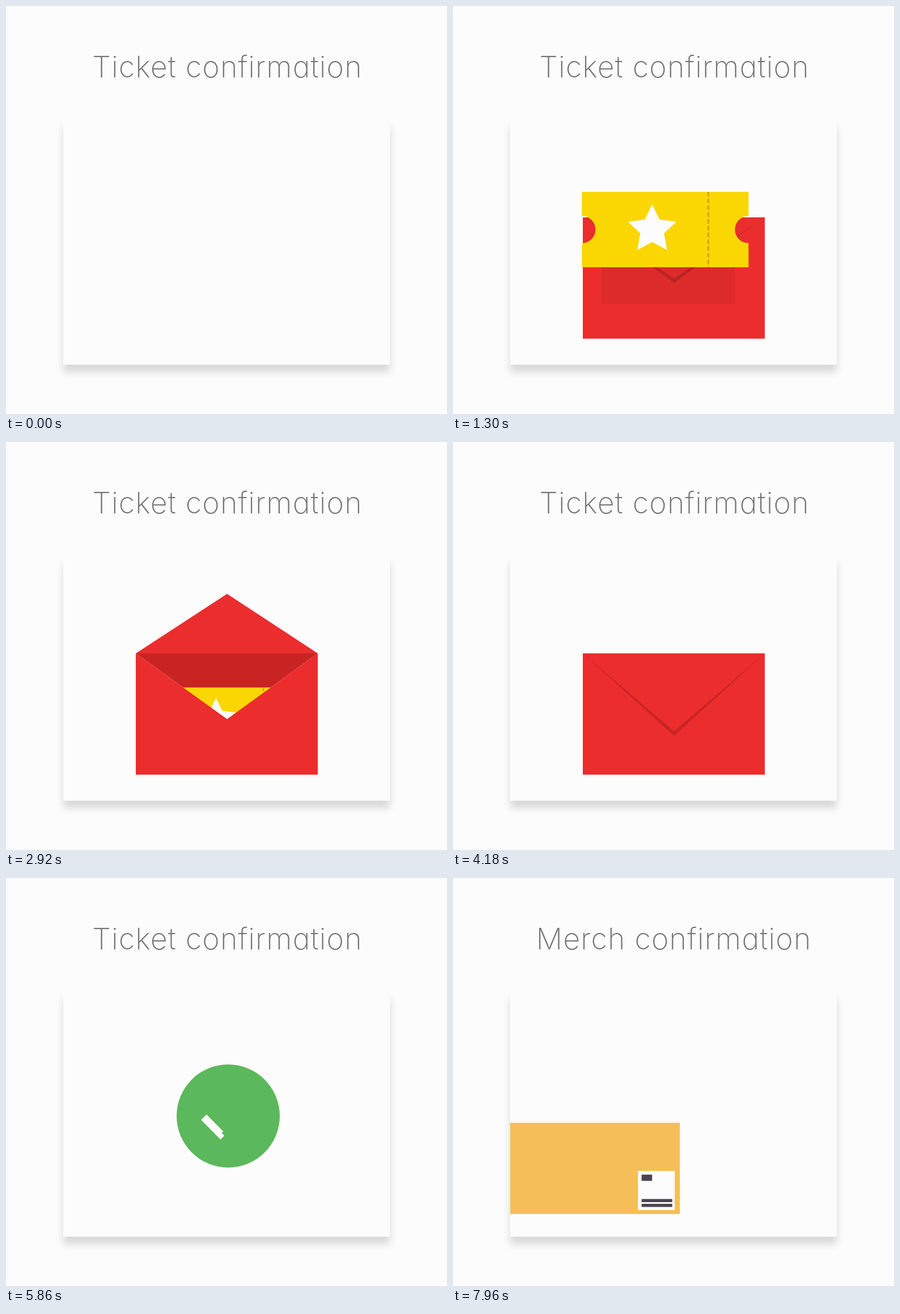
An HTML page that plays this animation: 778 px wide and 720 px high, repeating every 8000 ms.

```html
<!DOCTYPE html>
<html lang="en">
<head>
<meta charset="utf-8">
<title>Ticket confirmation</title>
<style>
  html, body { margin: 0; width: 100%; height: 100%; overflow: hidden; background: #fcfcfc; }
  #card {
    position: absolute; left: 101px; top: 201px; width: 576px; height: 432px;
    background: #fcfcfc; box-shadow: 0 13px 13px rgba(0, 0, 0, .145);
  }
  svg { position: absolute; left: 0; top: 0; display: block; }
  text {
    font: 200 52px Inter, Lato, sans-serif; font-feature-settings: "cv11";
    font-optical-sizing: none; letter-spacing: .022em; text-anchor: middle; fill: #757575;
  }
  #caption { font-size: 46px; }
</style>
</head>
<body>
<div id="card"></div>
<svg width="778" height="720" viewBox="0 0 778 720">
  <defs>
    <clipPath id="cardClip"><rect x="101" y="201" width="576" height="432"/></clipPath>
    <clipPath id="envelopeClip"><rect x="229" y="373" width="321" height="214"/></clipPath>
  </defs>
  <text id="ticketTitle" x="390.500" y="126">Ticket confirmation</text>
  <text id="merchTitle" x="389.500" y="126">Merch confirmation</text>
  <g clip-path="url(#cardClip)">
    <g id="envelope">
      <path id="flapBack" fill="#eb2d2e"/>
      <path fill="#c92424" d="M229 373H550L390 489Z"/>
      <path id="pocket" fill="#eb2d2e" d="M229 373L390 489L550 373V587H229Z"/>
      <path id="flapShadow" fill="#c92424"/>
      <path id="flapFront" fill="#eb2d2e"/>
      <g clip-path="url(#envelopeClip)">
        <rect id="ticketShadow" width="235" height="106"/>
      </g>
      <g id="ticket">
        <path fill="#fad703" d="M-147-66.5H147V-24A24 24 0 0 0 147 24V66.5H-147V24A24 24 0 0 0-147-24Z"/>
        <path d="M76-66.5V66.5" stroke="#cda600" stroke-width="3" stroke-dasharray="8 4"/>
        <polygon id="star" fill="#fcfcfc"/>
      </g>
    </g>
    <g id="done">
      <g id="badge">
        <circle r="91" fill="#5cb85c"/>
        <path id="check" d="M-43 2L-13.5 32L40.5-22" fill="none" stroke="#fcfcfc" stroke-width="13.5" pathLength="1" stroke-dasharray="1 2"/>
      </g>
      <text id="caption" x="391" y="530">Ticket confirmed</text>
    </g>
    <g id="parcel">
      <rect x="229" y="432" width="322" height="161" fill="#f5be58"/>
      <rect x="477" y="517" width="65" height="69" fill="#fcfcfc"/>
      <path fill="#4a4550" d="M483.5 523.5h18.500v11h-18.500zM483.5 566.5h54v5.5h-54zM483.5 575h54v5.5h-54z"/>
    </g>
  </g>
</svg>
<script>
const LOOP = 8000;
const $ = id => document.getElementById(id);
const set = (id, name, value) => $(id).setAttribute(name, value);
const show = (id, opacity) => set(id, 'opacity', opacity);

const linear = u => u;
const easeIn = u => u * u;
const easeOut = u => 1 - (1 - u) ** 2;
const easeOutQuart = u => 1 - (1 - u) ** 4;
const easeInOut = u => u < .5 ? 2 * u * u : 1 - 2 * (1 - u) ** 2;
const easeOutBack = u => 1 - 3.75 * (1 - u) ** 3 + 2.75 * (1 - u) ** 2;

// Eased progress from 0 to 1 between two times.
const progress = (t, start, end, ease = linear) =>
  ease(Math.min(1, Math.max(0, (t - start) / (end - start))));

const starPoints = Array.from({ length: 10 }, (_, i) => {
  const radius = i % 2 ? 22 : 44.6, angle = i * Math.PI / 5;
  return [-23 + radius * Math.sin(angle), -radius * Math.cos(angle)].map(v => v.toFixed(2));
});
set('star', 'points', starPoints.join(' '));

const flap = tip => `M229 373H550L390 ${tip}Z`;

function drawEnvelope(t) {
  const x = -450 * (1 - progress(t, 339, 849, easeOutQuart)) + 450 * progress(t, 4594, 5106, easeIn);
  const dip = 14 * Math.sin(Math.PI * progress(t, 2960, 3480));
  set('envelope', 'transform', `translate(${x} ${dip})`);
  show('envelope', t >= 400 && t < 5110 ? 1 : 0);

  const open = progress(t, 2080, 2500, easeInOut) - progress(t, 3640, 4400, easeOutBack);
  const tip = 481 - 213 * open;
  const isRaised = tip < 373;
  set('flapBack', 'd', isRaised ? flap(tip) : '');
  set('flapShadow', 'd', isRaised ? '' : flap(tip + 8));
  set('flapFront', 'd', isRaised ? '' : flap(tip));
}

function drawTicket(t) {
  const x = 390 - 436 * (1 - progress(t, 886, 1398, easeOut));
  const y = 394.5 - 104.5 * progress(t, 1320, 1760, easeInOut) + 240 * progress(t, 2520, 2960, easeIn);
  const scale = 1 - .155 * progress(t, 1320, 2000);
  const angle = -30 * (progress(t, 1320, 1760, easeInOut) - progress(t, 1800, 2060, easeInOut));
  set('ticket', 'transform', `translate(${x} ${y}) rotate(${angle}) scale(${scale})`);
  show('ticket', t > 886 && t < 3760 ? 1 : 0);

  // In front of the closed envelope at first, then behind its pocket.
  $('envelope').insertBefore($('ticket'), t < 2200 ? null : $('pocket'));

  set('ticketShadow', 'x', x - 112);
  set('ticketShadow', 'y', 420);
  show('ticketShadow', t > 886 ? .06 * (1 - progress(t, 1340, 1560)) : 0);
}

function drawDone(t, leaving) {
  const y = 420 - 43 * progress(t, 6280, 7140, easeInOut);
  const scale = progress(t, 5200, 5640, easeOut);
  set('badge', 'transform', `translate(392 ${y}) scale(${scale})`);
  const drawn = progress(t, 5600, 6200, easeInOut);
  set('check', 'stroke-dashoffset', 1 - drawn);
  show('check', drawn > 0 ? 1 : 0);
  show('caption', progress(t, 6760, 7220));
  show('done', t > 5200 ? 1 - leaving : 0);
}

function drawParcel(t) {
  const x = -450 * (1 - progress(t, 7839, 8349, easeOutQuart));
  set('parcel', 'transform', `translate(${x} 0)`);
  show('parcel', t >= 7900 ? 1 : 0);
}

function render() {
  const t = performance.now() % LOOP;
  const leaving = progress(t, 7520, 7680);
  show('ticketTitle', 1 - leaving);
  show('merchTitle', leaving);
  drawEnvelope(t);
  drawTicket(t);
  drawDone(t, leaving);
  drawParcel(t);
  requestAnimationFrame(render);
}
render();
</script>
</body>
</html>
```
